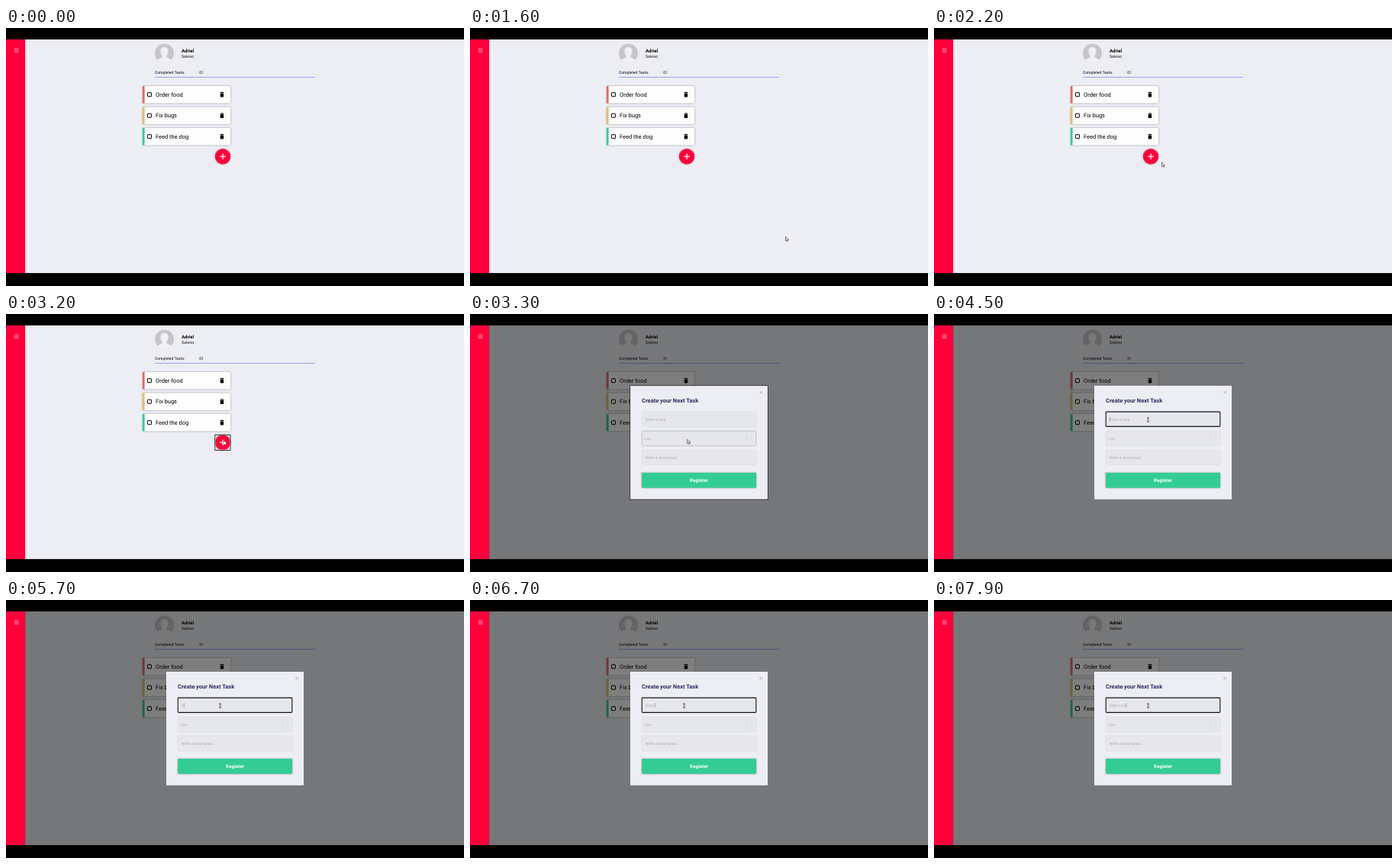
These frames come from a looping animation (600x338 px, 8 s). An HTML page:

```html
<!DOCTYPE html>
<html lang="en">
<head>
<meta charset="utf-8">
<title>Task list</title>
<style>
  html, body { margin: 0; width: 100%; height: 100%; overflow: hidden; background: #000; }
  svg { display: block; width: 100%; height: 100%; }
  text { font: 5px Roboto, Arial, sans-serif; text-rendering: geometricPrecision; white-space: pre; }
  .task text { font-size: 7.5px; }
  .name { font-size: 6px; font-weight: 700; }
  .title { font-size: 7.5px; font-weight: 700; fill: #2b2b61; }
  .register { font-size: 6.3px; font-weight: 700; fill: #fff; text-anchor: middle; }
  .hint text { fill: #a8a8b3; }
  .field { fill: #e6e7eb; stroke: #d3d5dc; stroke-width: .5; }
  .card { fill: #fefdfe; filter: drop-shadow(0 .5px .8px #0006); }
  .lift { filter: drop-shadow(0 .6px .9px #0006); }
  .line { fill: none; stroke: #000; }

  /* One shared 8 s clock; the tiny lead keeps steps clear of their exact edges. */
  .anim { animation: 8s step-end -2ms infinite; }
  .ring { animation-name: ring; }
  .modal { animation-name: modal; }
  .modal-ring { animation-name: modal-ring; }
  .hover { animation-name: hover; }
  .focus { animation-name: focus; }
  .empty { animation-name: empty; }
  .typed { animation-name: typed; }
  .cover { animation-name: type; }
  .caret { animation-name: type, blink; }
  .mouse { animation-name: move; }
  .arrow { animation-name: arrow; }
  .hand { animation-name: hand; }
  .beam { animation-name: beam; }

  @keyframes ring { 0% { opacity: 0 } 40%, 100% { opacity: 1 } }
  @keyframes modal { 0% { opacity: 0 } 41.25%, 100% { opacity: 1 } }
  @keyframes modal-ring { 0% { opacity: 1 } 56.25%, 100% { opacity: 0 } }
  @keyframes hover { 0% { opacity: 1 } 47.5%, 100% { opacity: 0 } }
  @keyframes focus { 0% { opacity: 0 } 56.25%, 100% { opacity: 1 } }
  @keyframes empty { 0% { opacity: 1 } 71.25%, 100% { opacity: 0 } }
  @keyframes typed { 0% { opacity: 0 } 71.25%, 100% { opacity: 1 } }
  @keyframes type {
    0% { transform: none }
    71.25% { transform: translateX(2.97px) }
    76.25% { transform: translateX(4.6px) }
    78.75% { transform: translateX(7.32px) }
    80% { transform: translateX(9px) }
    82.5% { transform: translateX(10.65px) }
    83.75% { transform: translateX(11.9px) }
    86.25% { transform: translateX(15.85px) }
    96.25% { transform: translateX(18.6px) }
    98.75%, 100% { transform: translateX(21.35px) }
  }
  @keyframes blink {
    0%, 63.75%, 93.75% { opacity: 0 }
    56.25%, 71.25%, 96.25%, 100% { opacity: 1 }
  }
  @keyframes move {
    0%, 13.75% { transform: translate(152px, 298px) }
    15% { transform: translate(265px, 296px) }
    16.25% { transform: translate(373px, 291px) }
    20% { transform: translate(413px, 273px); animation-timing-function: steps(3) }
    23.75% { transform: translate(340px, 209px); animation-timing-function: steps(4) }
    28.75% { transform: translate(284px, 164.5px) }
    41.25% { transform: translate(284.3px, 163.8px); animation-timing-function: steps(7) }
    50% { transform: translate(282px, 147px) }
    51.25% { transform: translate(281px, 142px) }
    52.5%, 100% { transform: translate(280.5px, 138.5px) }
  }
  @keyframes arrow {
    0%, 28.75%, 50%, 100% { opacity: 0 }
    13.75%, 41.25% { opacity: 1 }
  }
  @keyframes hand { 0%, 41.25%, 100% { opacity: 0 } 28.75% { opacity: 1 } }
  @keyframes beam { 0% { opacity: 0 } 50%, 100% { opacity: 1 } }
</style>
</head>
<body>
<svg viewBox="0 0 600 338" preserveAspectRatio="none">
  <defs>
    <g id="row">
      <rect class="card" width="115" height="22.5" rx=".8"/>
      <rect class="line" x="6.4" y="8.7" width="5" height="5" rx=".4" stroke-width="1"/>
      <path d="M101.4 8.2h1.3l.4-.5h1.6l.4.5h1.3v.9h-5zM101.7 9.6h4.4v4.2q0 .7-.7.7h-3q-.7 0-.7-.7z"/>
    </g>
    <clipPath id="face"><circle cx="207.5" cy="33" r="12.5"/></clipPath>
  </defs>

  <rect y="15" width="600" height="306.3" fill="#edeef3"/>

  <g clip-path="url(#face)">
    <rect x="195" y="20" width="25" height="26" fill="#c5c6ca"/>
    <path d="M197 46q.5-5 5-6.2 3-.8 3-2.8-2.600-2.500-2.600-6.500 0-5.500 5.100-5.500t5.100 5.500q0 4-2.600 6.500 0 2 3 2.800 4.500 1.200 5 6.200z" fill="#f0f0f3"/>
  </g>
  <text class="name" x="230" y="32.4">Adriel</text>
  <text x="230" y="38.6">Salvino</text>
  <text x="195" y="60.4">Completed Tasks</text>
  <text x="253.200" y="60.4">01</text>
  <rect x="195" y="64" width="210" height=".8" fill="#8f8ff2"/>

  <g class="task" transform="translate(179 76)">
    <use href="#row"/>
    <rect width="2.600" height="22.5" fill="#ec665c"/>
    <text x="17" y="13.6">Order food</text>
  </g>
  <g class="task" transform="translate(179 103.500)">
    <use href="#row"/>
    <rect width="2.600" height="22.5" fill="#e6c064"/>
    <text x="17" y="13.6">Fix bugs</text>
  </g>
  <g class="task" transform="translate(179 131)">
    <use href="#row"/>
    <rect width="2.600" height="22.5" fill="#33cc95"/>
    <text x="17" y="13.6">Feed the dog</text>
  </g>

  <circle class="lift" cx="284" cy="168.400" r="10.100" fill="#ff003c"/>
  <path class="line" d="M280.200 168.400h7.600M284 164.600v7.600" style="stroke:#fff" stroke-width="1.200"/>
  <g class="anim ring">
    <rect class="line" x="274.500" y="159" width="18.800" height="18.800" style="stroke:#fff" stroke-width=".5"/>
    <rect class="line" x="273.800" y="158.300" width="20.200" height="20.200" stroke-width=".8"/>
  </g>

  <g class="anim modal">
    <rect x="25" y="15" width="575" height="306.300" opacity=".5"/>
    <rect x="210" y="94" width="180" height="148.800" fill="#edeef3"/>
    <g class="anim modal-ring">
      <rect class="line" x="209.900" y="93.900" width="180.200" height="149" stroke="#222" stroke-width="1" style="stroke:#222"/>
      <rect class="line" x="210.700" y="94.700" width="178.600" height="147.400" style="stroke:#fff" stroke-width=".6"/>
    </g>
    <path class="line" d="M379.200 100.700l3.800 3.800m0-3.800l-3.800 3.800" style="stroke:#8c8c9c" stroke-width=".6"/>
    <text class="title" x="225" y="115.900">Create your Next Task</text>

    <rect class="field" x="225.200" y="128.200" width="149.600" height="19.600" rx=".8"/>
    <rect class="field" x="225.200" y="153.200" width="149.600" height="19.600" rx="1.200"/>
    <rect class="field" x="225.200" y="178.200" width="149.600" height="19.600" rx=".8"/>
    <rect class="anim hover line" x="225.200" y="153.200" width="149.600" height="19.600" rx="1.200" style="stroke:#aeb0b5" stroke-width=".6"/>
    <path class="line" d="M363.400 155.600v14.800" style="stroke:#d0d1d5" stroke-width=".4"/>
    <path class="line" d="M367.700 162.400l1.500 1.400 1.500-1.400" style="stroke:#bbbcc2" stroke-width=".6"/>

    <g class="hint">
      <text class="anim empty" x="230" y="139.700">Enter a task</text>
      <text x="228" y="164.700">Low</text>
      <text x="230" y="189.700">Write a description</text>
      <g class="anim typed">
        <text x="230" y="139.700">Start a na</text>
        <rect class="anim cover" x="230" y="134" width="26" height="8" fill="#e6e7eb"/>
      </g>
    </g>
    <rect class="anim caret" x="230" y="135" width=".5" height="6" fill="#777"/>
    <rect class="anim focus line" x="225.200" y="128.100" width="149.600" height="19.300" rx=".9" style="stroke:#15151f" stroke-width="1.100"/>

    <rect class="lift" x="225" y="208" width="150" height="19.700" rx="1.200" fill="#33cc95"/>
    <text class="register" x="300" y="220.100">Register</text>
  </g>

  <rect class="lift" y="15" width="25" height="306.300" fill="#ff003c"/>
  <path class="line" d="M11 27.500h5.600M11 29.500h5.600M11 31.500h5.600" style="stroke:#ffd0da" stroke-width=".7"/>
  <path d="M0 0h600v15H0zM0 321.300h600V338H0z"/>

  <g class="anim mouse">
    <path class="anim arrow" d="M.4.4v5.500l1.300-1.200.9 2 1-.4-.9-2h1.700z" fill="#fff" stroke="#111" stroke-width=".6"/>
    <path class="anim hand" d="M.5 1q.6-.7 1.200 0v1.800l2.400.5q.6.200.5 1L4.200 6.500H1.400L-.4 4.300q.2-.8.9-.2z" fill="#fff" stroke="#222" stroke-width=".4"/>
    <g class="anim beam line">
      <path d="M-1.400-2.800h2.800M-1.400 2.800h2.800M0-2.800v5.600" style="stroke:#fff" stroke-width="1.400"/>
      <path d="M-1.300-2.700h2.600M-1.300 2.700h2.600M0-2.700v5.400" stroke-width=".8"/>
    </g>
  </g>
</svg>
</body>
</html>
```
